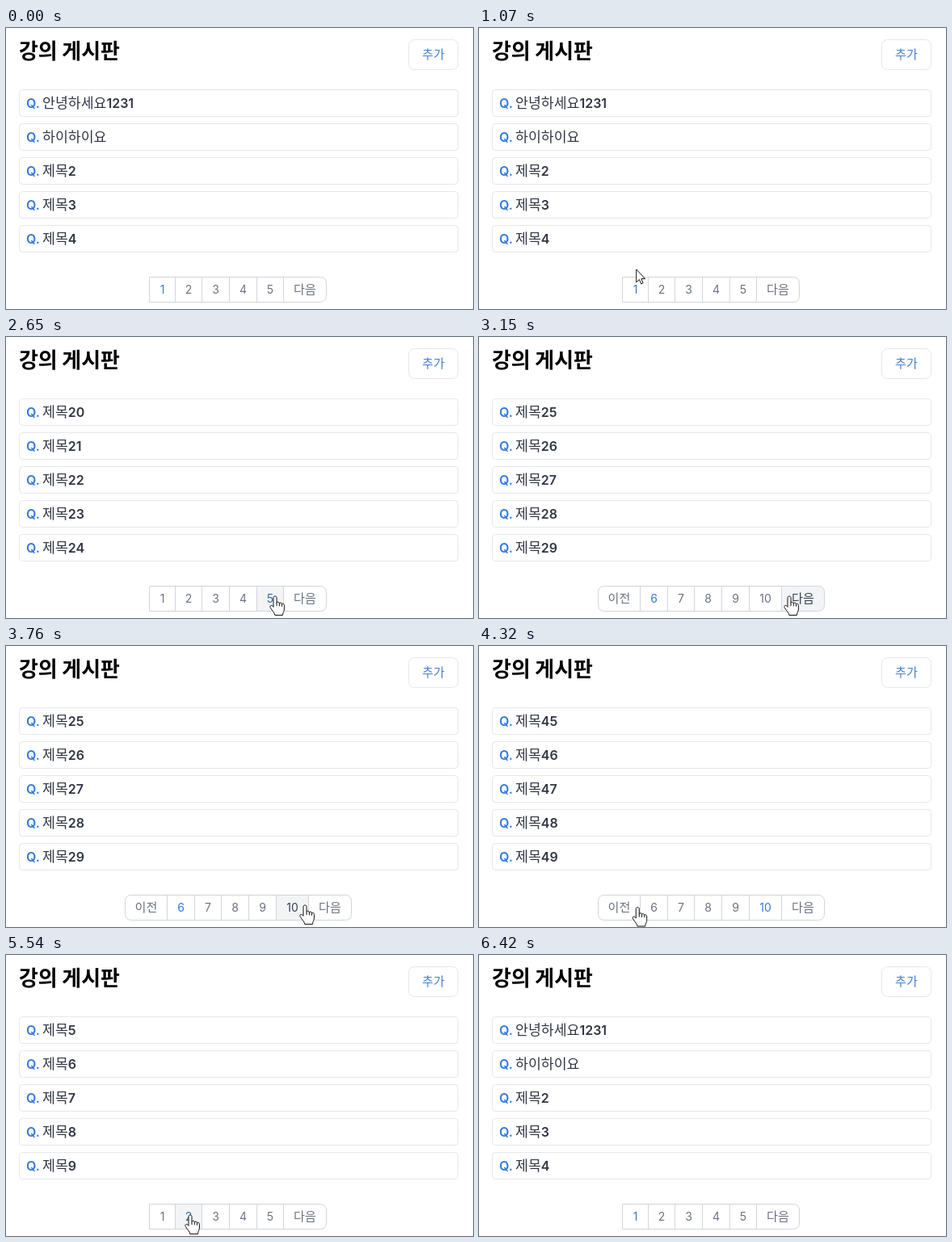
Write an HTML page that moves like this. It is 578x348 px and loops after 7.08 s.

```html
<!DOCTYPE html>
<html lang="ko">
<head>
<meta charset="utf-8">
<title>강의 게시판</title>
<style>
html, body { margin: 0; width: 100%; height: 100%; overflow: hidden; background: #fff; }
svg { display: block; width: 578px; height: 348px; font: 400 14px Inter, "Noto Sans CJK KR", "Noto Sans CJK", sans-serif; }
.ko { font-family: "Noto Sans CJK KR", "Noto Sans CJK", sans-serif; font-size: 1.08em; }
.title { font-size: 24px; font-weight: 700; }
.card { fill: #fff; stroke: #e5e7eb; }
.add { fill: #4584d0; }
.q, .item { font-size: 16px; font-weight: 600; }
.q { fill: #317adf; }
.item { fill: #303643; }
.item .ko { font-weight: 500; }
.edge { fill: none; stroke: #d1d5db; }
.hover { fill: #f3f4f6; }
.cell { fill: #6b7280; text-anchor: middle; }
.cell.over { fill: #374151; }
.cell.on { fill: #317adf; }
.cell.on.over { fill: #2f6cb0; }
.pointer path { fill: #fff; stroke: #111; stroke-linejoin: round; }
</style>
</head>
<body>
<svg viewBox="0 0 578 348">
  <text class="title" x="16" y="37.5"><tspan class="ko">강의</tspan> <tspan class="ko">게시판</tspan></text>
  <rect class="card" x="498.5" y="14.5" width="61" height="37" rx="7"/>
  <text class="add" x="515" y="38"><tspan class="ko">추가</tspan></text>
  <g id="list"></g>
  <g id="pager"></g>
  <g id="pointer" class="pointer">
    <path id="arrow" d="M0 0V16L3.7 12.6 6 18 8.4 17 6.1 11.7H11Z"/>
    <path id="hand" d="M-2 1.7C-2-.6 2-.6 2 1.7V8.2C2.3 6.8 5.2 6.9 5.3 8.8C5.8 7.6 8.4 7.8 8.5 9.8C9 8.8 11.4 9.2 11.4 11.4V16C11.4 19 9.6 20 9.4 23.5H-.2C-.3 21-3 18.5-5.6 14.6C-7.2 12-4.6 10.4-3 12.2L-2 13.4ZM2 8V12M5.3 8.8V12.4M8.5 9.8V12.8"/>
  </g>
</svg>
<script>
const LOOP = 7080, SHOW = 580, HIDE = 6420;
const AIM = 150, FETCH = 130, REST = 100, TRAVEL = 350;
const PREV = '이전', NEXT = '다음';
const $ = id => document.getElementById(id);

// Each visit: the button pressed, when its page appears, and where the pointer rests.
const visits = [
  { button: 2, load: 1350, x: 228, y: 322 },
  { button: 3, load: 1960, x: 275, y: 317 },
  { button: 4, load: 2310, x: 302, y: 321 },
  { button: 5, load: 2650, x: 333, y: 321 },
  { button: NEXT, load: 3080, x: 384, y: 321 },
  { button: 10, load: 3900, x: 370, y: 321 },
  { button: PREV, load: 4520, x: 168, y: 324 },
  { button: 3, load: 5200, x: 252, y: 322 },
  { button: 2, load: 5540, x: 228, y: 322 },
  { button: 1, load: 5870, x: 196, y: 321 }
];

// The pointer enters, makes its visits, and leaves.
const stops = [{ x: 68, y: 211 }, ...visits, { x: 350, y: 345, arrive: HIDE }];
let page = 1;
stops.forEach((s, i) => {
  if (!i) return;
  const before = stops[i - 1];
  s.arrive ??= s.load - AIM;
  before.leave = i === 1 ? SHOW : Math.max(before.load + REST, s.arrive - TRAVEL);
  if (s.button) page = s.page = { [NEXT]: 6, [PREV]: 5 }[s.button] ?? s.button;
});

const ko = s => String(s).replace(/[가-힣]+/g, '<tspan class="ko">$&</tspan>');
const itemTitle = n => ['안녕하세요1231', '하이하이요'][n] || '제목' + n;

function listMarkup(page) {
  return [0, 1, 2, 3, 4].map(i => {
    const y = 76.5 + 42 * i;
    return `<rect class="card" x="16.5" y="${y}" width="543" height="33" rx="4"/>
      <text class="q" x="25" y="${y + 22.5}">Q.</text>
      <text class="item" x="45" y="${y + 22.5}">${ko(itemTitle((page - 1) * 5 + i))}</text>`;
  }).join('');
}

const glyphWidth = c => c === '1' ? 7.1 : c > '9' ? 13.55 : 8.8;
const cellWidth = name => [...String(name)].reduce((w, c) => w + glyphWidth(c), 24.9);

function pagerMarkup(loaded, selected, hovered) {
  const first = loaded > 5 ? 6 : 1, r = first > 1 ? 8 : 0;
  const names = [0, 1, 2, 3, 4].map(i => first + i).concat(NEXT);
  if (first > 1) names.unshift(PREV);
  const edges = [first > 1 ? 147.3 : 177.2];
  names.forEach((name, i) => edges.push(edges[i] + cellWidth(name) + (name === NEXT)));
  const xs = edges.map(x => Math.floor(x) + .5), x0 = xs[0], x1 = xs[names.length];
  const frame = `M${x0 + r} 308.5H${x1 - 8}q8 0 8 8v15q0 8-8 8H${x0 + r}q${-r} 0 ${-r} ${-r}V${308.5 + r}q0 ${-r} ${r} ${-r}z`;
  let back = '', text = '', lines = '';
  names.forEach((name, i) => {
    const a = xs[i], b = xs[i + 1];
    const over = name === hovered, on = name === selected && loaded === selected;
    if (over) back = `<rect class="hover" x="${a}" y="308" width="${b - a}" height="32" clip-path="url(#shape)"/>`;
    if (i) lines += `M${a} 308.5V339.5`;
    text += `<text class="cell${on ? ' on' : ''}${over ? ' over' : ''}" x="${(a + b) / 2}" y="329">${ko(name)}</text>`;
  });
  return `<clipPath id="shape"><path d="${frame}"/></clipPath>${back}<path class="edge" d="${frame}${lines}"/>${text}`;
}

const lastPage = (t, delay) => visits.filter(v => v.load - delay <= t).pop()?.page ?? 1;

function pointerAt(t) {
  const i = stops.findIndex(s => s.arrive > t), from = stops[i - 1], to = stops[i];
  const k = Math.max(0, (t - from.leave) / (to.arrive - from.leave));
  return [from.x + (to.x - from.x) * k, from.y + (to.y - from.y) * k];
}

let shown;
function draw(t) {
  const loaded = lastPage(t, 0), selected = lastPage(t, FETCH);
  const hovered = visits.find(v => t >= v.arrive && t < v.leave)?.button;
  const key = [loaded, selected, hovered].join();
  if (key !== shown) {
    shown = key;
    $('list').innerHTML = listMarkup(loaded);
    $('pager').innerHTML = pagerMarkup(loaded, selected, hovered);
  }
  const visible = t >= SHOW && t < HIDE;
  $('pointer').style.display = visible ? '' : 'none';
  if (!visible) return;
  const [x, y] = pointerAt(t), overPager = y > 306 && x > 140;
  $('pointer').setAttribute('transform', `translate(${x} ${y})`);
  $('hand').style.display = overPager ? '' : 'none';
  $('arrow').style.display = overPager ? 'none' : '';
}

const start = performance.now();
function tick() {
  draw((performance.now() - start) % LOOP);
  requestAnimationFrame(tick);
}
tick();
</script>
</body>
</html>
```
